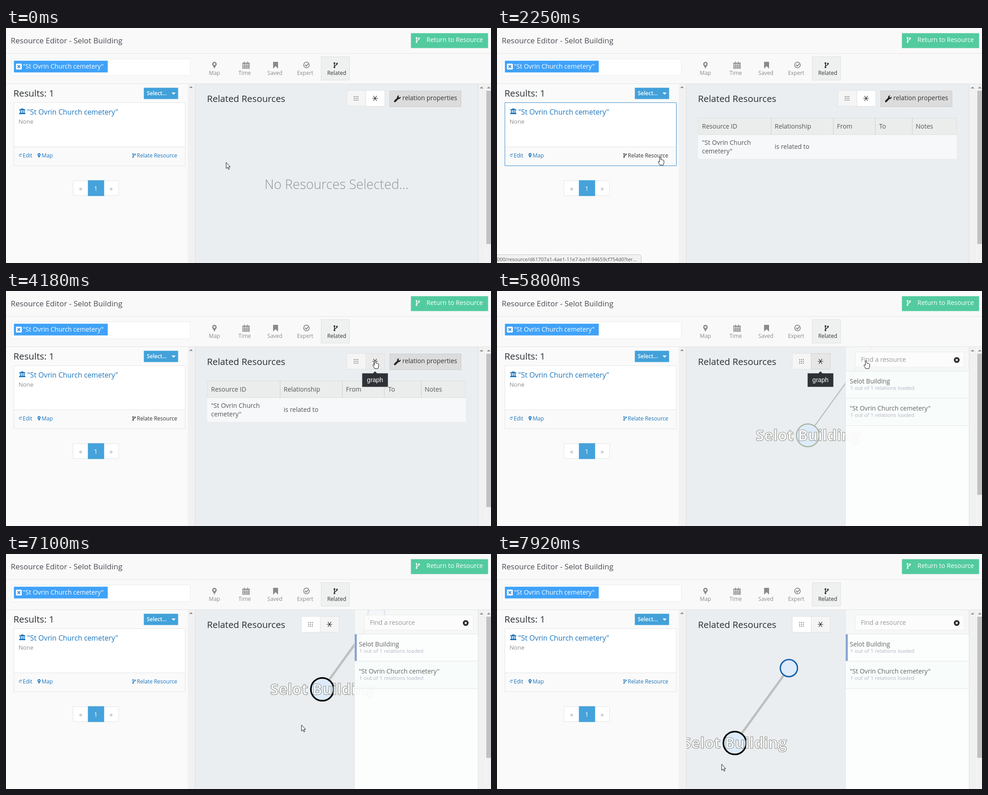
Animation, 1075 px wide and 521 px high, one loop 7.99 s. Source, as an HTML page:

```html
<!DOCTYPE html>
<html lang="en">
<head>
<meta charset="utf-8">
<title>Resource Editor</title>
<style>
html, body { margin: 0; width: 100%; height: 100%; overflow: hidden; background: #fafafa; }
svg { display: block; width: 1075px; height: 521px; }
text { font: 14px "Open Sans", sans-serif; fill: #555; white-space: pre; }
.mid { text-anchor: middle; }
.h { font-size: 20.3px; fill: #2b2f33; }
.s12 { font-size: 12px; }
.nav { font-size: 12px; fill: #8a8a8a; text-anchor: middle; }
.blue { fill: #1c75bc; }
.white { fill: #fff; }
.sub { font-size: 11.65px; fill: #b4b5c2; }
.box { fill: #fff; stroke: #e4e4e4; }
.line { fill: none; stroke: #e4e4e4; }
.arrow { fill: #8d8d8d; }
#label { font-size: 33.7px; font-weight: 700; text-anchor: middle; fill: #fff; stroke: #8f8f86; stroke-width: 1.1; }
</style>
</head>
<body>
<svg viewBox="0 0 1075 521">
  <defs>
    <g id="fork" fill="none" stroke="currentColor" stroke-width="1.5">
      <circle cx="2" cy="2" r="1.2"/><circle cx="2" cy="11" r="1.2"/><circle cx="7.5" cy="3" r="1.2"/>
      <path d="M2 3V10M7.5 4C7.5 7.5 2 6 2 9"/>
    </g>
    <path id="pin" d="M5 0A5 5 0 0 0 0 5C0 8 3 10 5 15.5C7 10 10 8 10 5A5 5 0 0 0 5 0ZM5 2.8A2.2 2.2 0 1 1 5 7.2A2.2 2.2 0 1 1 5 2.8Z" fill="currentColor" fill-rule="evenodd"/>
    <path id="up" d="M0 4L4 0L8 4Z"/>
    <path id="dots" d="M0 0H10M0 4H10M0 8H10" fill="none" stroke="#444" stroke-width="1.6" stroke-dasharray="1.8 2.2"/>
    <path id="star" d="M-6 0H6M-3.5 -5.5L3.5 5.5M3.5 -5.5L-3.5 5.5" fill="none" stroke="#222" stroke-width="1.2"/>
    <clipPath id="stage"><path d="M420 124H1046V521H420Z"/></clipPath>
  </defs>

  <!-- top bars -->
  <path d="M0 0H1075V123H0Z" fill="#f9f9f9"/>
  <path class="line" d="M0 56.5H1075M0 123.5H1075"/>
  <text x="10.5" y="34" style="font-size:17px;fill:#4a4d55">Resource Editor - Selot Building</text>
  <path d="M897.5 11.5H1068.5V44.5H897.5Z" fill="#52cb9f"/>
  <use href="#fork" x="908" y="20" color="#fff"/>
  <text class="white" x="932" y="31">Return to Resource</text>
  <path class="box" d="M12.5 68.5H408.5V105.5H12.5Z" style="stroke:#ebebeb"/>
  <path d="M17.5 72.5H225.5V98.5H17.5Z" fill="#3fa2f8"/>
  <rect x="22" y="79" width="13" height="13" rx="1.5" fill="#fff"/>
  <path d="M25.5 82.5L31.5 88.5M31.5 82.5L25.5 88.5" stroke="#4a90d0" stroke-width="2.2"/>
  <text class="white" x="37.5" y="90">"St Ovrin Church cemetery"</text>

  <rect x="698.5" y="63.5" width="63" height="52" fill="#eff1f1" stroke="#dfe1e1"/>
  <g color="#8a8a8a" fill="none" stroke="#8a8a8a">
    <use href="#pin" x="457" y="75" stroke="none"/>
    <path d="M524.5 77.5H539.5V89.5H524.5ZM524 79.5H540M524 83.5H540M524 86.5H540M528.5 80V90M532.5 80V90M536.5 80V90M528.5 74V79M535.5 74V79" stroke-width="1.3"/>
    <path d="M592 75H603V90L597.5 84.5L592 90Z" fill="#8a8a8a" stroke="none"/>
    <circle cx="666" cy="82" r="6.3" stroke-width="1.7"/>
    <path d="M662.5 81.5L665.5 84.5L670 79.5" stroke-width="2"/>
  </g>
  <use href="#fork" x="726" y="76" color="#222"/>
  <text class="nav" x="462" y="104">Map</text>
  <text class="nav" x="529" y="104">Time</text>
  <text class="nav" x="596" y="104">Saved</text>
  <text class="nav" x="663" y="104">Expert</text>
  <text class="nav" x="733" y="104" style="fill:#333">Related</text>

  <!-- results -->
  <text class="h" x="16.5" y="152">Results: 1</text>
  <path d="M305.5 132.5H381.5V157.5H305.5Z" fill="#42a1da"/>
  <text class="white s12" x="312" y="149" style="font-weight:600">Select...</text>
  <path d="M367 143H376L371.5 148Z" fill="#fff"/>
  <path d="M17 165H398V305H17Z" fill="#fff"/>
  <path d="M17 263H398V305H17Z" fill="#fafafa"/>
  <path class="line" d="M17 263.5H398"/>
  <path class="line" id="card" d="M17.5 165.5H397.5V305.5H17.5Z"/>
  <path class="blue" d="M36 178L43 181V182.5H29V181ZM31 183H33V188H31ZM35 183H37V188H35ZM39 183H41V188H39ZM30 188H42V189H43V191H29V189H30Z"/>
  <text class="blue" x="47" y="192" style="font-size:15.8px">"St Ovrin Church cemetery"</text>
  <text x="27.8" y="212" style="font-size:13px;fill:#8b8b8b">None</text>
  <path d="M33.5 280.3A2.6 2.6 0 1 0 34 283.5M34 278.5V281H31.5" fill="none" stroke="#1c75bc"/>
  <text class="blue s12" x="37" y="287">Edit</text>
  <use href="#pin" transform="translate(70 277.5) scale(.66 .69)" color="#1c75bc"/>
  <text class="blue s12" x="79" y="287">Map</text>
  <g id="relate">
    <use href="#fork" transform="translate(280 277.5) scale(.8)"/>
    <text class="s12" x="290" y="287" style="fill:currentColor">Relate Resource</text>
  </g>
  <path class="box" d="M148.5 338.5H249.5V371.5H148.5Z"/>
  <path d="M181.5 337.5H217.5V372.5H181.5Z" fill="#45a2da"/>
  <text class="mid" x="165.5" y="361" style="fill:#999">«</text>
  <text class="mid white" x="199" y="361">1</text>
  <text class="mid" x="233" y="361" style="fill:#999">»</text>
  <path d="M403 124H419V521H403Z" fill="#f1f1f1"/>
  <use class="arrow" href="#up" x="406" y="129"/>

  <!-- related resources -->
  <path d="M419.5 124V521M1046.5 124V521" stroke="#dcdfe1"/>
  <path d="M420 124H1046V521H420Z" fill="#eaeef1"/>
  <path d="M1047 124H1075V521H1047Z" fill="#f1f1f1"/>
  <path d="M1063.5 124V521" stroke="#fafafa"/>
  <use class="arrow" href="#up" x="1050" y="130"/>
  <use class="arrow" href="#up" x="1066" y="130"/>
  <rect id="thumb" x="1064.5" y="139" width="10.5" height="340" fill="#c1c1c1"/>

  <g id="graph" clip-path="url(#stage)">
    <line id="link" stroke="#bfbfbf"/>
    <circle id="other" r="19" fill="#ddebfa" stroke="#1860aa" stroke-width="3"/>
    <circle id="node" r="25.3" fill="#ddebfa"/>
    <text id="label">Selot Building</text>
    <path d="M772 124H1047V521H772Z" fill="#fff" fill-opacity=".88"/>
    <path d="M772 124H1047V177H772Z" fill-opacity=".025"/>
    <path d="M773 178H1047V298H773Z" fill="#e6f2ee" fill-opacity=".2"/>
    <g id="chosen"><path d="M773 178H1047V237H773Z" fill="#fff" fill-opacity=".6"/><path d="M772 177H777.5V238H772Z" fill="#89a2d0"/></g>
    <path d="M772.5 124V521M772 177.5H1047M772 237.5H1047M772 298.5H1047" class="line" style="stroke:#e2e7e7"/>
    <path class="box" d="M794.5 135.5H1035.5V168.5H794.5Z" style="stroke:#ececec" fill-opacity=".7"/>
    <text x="806.5" y="157" style="fill:#999">Find a resource</text>
    <circle cx="1019" cy="153" r="6.3" fill="#222"/>
    <path d="M1016.7 150.7L1021.3 155.3M1021.3 150.7L1016.7 155.3" stroke="#fff" stroke-width="1.7"/>
    <text x="782" y="205" style="fill:#666">Selot Building</text>
    <text class="sub" x="783" y="219">1 out of 1 relations loaded</text>
    <text x="782" y="265" style="fill:#666">"St Ovrin Church cemetery"</text>
    <text class="sub" x="783" y="279">1 out of 1 relations loaded</text>
  </g>

  <text class="h" x="445.5" y="164">Related Resources</text>
  <text id="empty" class="mid" x="732.5" y="357" style="font-size:29px;font-weight:300;fill:#929496">No Resources Selected...</text>
  <g id="table">
    <path d="M446 199H1019V237H446Z" fill="#ebecec"/>
    <path d="M446 237H1019V290H446Z" fill="#f7f8f9"/>
    <path d="M446.5 237V199.5H1018.5V237M446 236.5H1019" fill="none" stroke="#dedfe0"/>
    <path d="M607.5 199V237M745.5 199V237M838.5 199V237M920.5 199V237" stroke="#cdcfd0"/>
    <text x="454.5" y="223">Resource ID</text>
    <text x="615.5" y="223">Relationship</text>
    <text x="753.5" y="223">From</text>
    <text x="847" y="223">To</text>
    <text x="928" y="223">Notes</text>
    <text x="454.5" y="259">"St Ovrin Church</text>
    <text x="454.5" y="278">cemetery"</text>
    <text x="615.5" y="268">is related to</text>
  </g>
  <g id="props">
    <path d="M850.5 139.5H1008.5V174.5H850.5Z" fill="#dcdcdc" stroke="#cbcbcb"/>
    <path d="M862 162.5L869 155.5" stroke="#222" stroke-width="4" stroke-linecap="round"/>
    <path d="M874.5 152A4 4 0 1 1 871 149.5L870 153L872 154.5Z" fill="#222"/>
    <text x="878.5" y="160" style="fill:#333">relation properties</text>
  </g>
  <g id="tools">
    <rect id="gridBtn" x="755.5" y="138.5" width="42" height="35" stroke="#e0e0e0"/>
    <rect id="graphBtn" x="797.5" y="138.5" width="42" height="35"/>
    <use href="#dots" x="771" y="152"/>
    <use href="#star" x="818" y="156"/>
    <g id="tip">
      <path d="M789.5 182.5H813.5L818 178L822.5 182.5H846.5V212.5H789.5Z" fill="#2e3135"/>
      <text class="mid white" x="818" y="202" style="font-family:'Liberation Sans',Arial,sans-serif">graph</text>
    </g>
  </g>
  <g id="status">
    <path d="M-1 502.5H315Q319.5 502.5 319.5 507V522H-1Z" fill="#f2f2f2" stroke="#c4c4c4"/>
    <text x="0" y="517" style="font-size:11px">000/resource/d61707a1-4ae1-11e7-ba1f-94659cf754d0?ter...</text>
  </g>

  <path id="pointer" d="M0 0V13.5L3 10.8L5.2 15.6L7.2 14.7L5.1 10H9Z" fill="#fff" stroke="#111" stroke-linejoin="round"/>
  <path id="hand" d="M-1.5 1.2Q0 -.8 1.5 1.2V6Q2.5 5 4 6.5Q5.5 5.8 6.2 7.2Q8 7 8 9V13Q7.5 15 6.5 18H-1Q-2 15 -4.7 11.5Q-5.2 9.5 -3.5 9.5L-1.5 11Z" fill="#fff" stroke="#111" stroke-linejoin="round"/>
</svg>
<script>
const LOOP = 7990;
const $ = id => document.getElementById(id);

// bursts of picture updates: start, end, steps
const BURSTS = [[0, 0, 1], [290, 1030, 11], [1130, 1260, 3], [2250, 2250, 1], [2560, 3310, 11],
  [3380, 4110, 11], [4180, 4180, 1], [5330, 5560, 4], [5800, 6510, 11], [6600, 7330, 11], [7410, 7920, 8]];

// time, x, y
const CURSOR = [[216, 488, 298], [600, 440, 302], [1030, 362, 286], [2490, 362, 286],
  [3310, 504, 331], [4110, 818, 154], [5800, 818, 154], [6440, 758, 218],
  [6740, 757, 260], [7111, 655, 379], [7330, 541, 386], [7920, 498, 466]];
const NODE = [[5800, 689, 320], [6440, 772, 253], [6510, 782, 246], [6740, 772, 253],
  [7111, 701, 300], [7330, 575, 306], [7920, 527, 419]];
const SPREAD = [[5800, 1.35], [6440, 1.2], [6800, 1]];

function snap(t) {
  const [a, b, n] = BURSTS.findLast(s => s[0] <= t);
  if (n < 2) return a;
  const gap = (b - a) / (n - 1);
  return a + gap * Math.min(n - 1, Math.floor((t - a) / gap + 0.25));
}

function at(keys, t) {
  const i = keys.findIndex(k => k[0] >= t);
  if (i < 0) return keys.at(-1).slice(1);
  if (i === 0) return keys[0].slice(1);
  const p = keys[i - 1], q = keys[i], f = (t - p[0]) / (q[0] - p[0]);
  return p.slice(1).map((v, j) => v + (q[j + 1] - v) * f);
}

function set(id, attrs) {
  for (const k in attrs) $(id).setAttribute(k, attrs[k]);
}
const show = (id, on) => set(id, { visibility: on ? "visible" : "hidden" });
const inside = ([x, y], l, t, r, b) => x >= l && x <= r && y >= t && y <= b;

function drawGraph(t) {
  const [x, y] = at(NODE, t), [k] = at(SPREAD, t);
  const ox = x + 120 * k, oy = y - 166 * k;
  const picked = t >= 6735;
  set("link", { x1: x, y1: y, x2: ox, y2: oy, "stroke-width": picked ? 5 : 2.5 });
  set("other", { cx: ox, cy: oy });
  set("node", { cx: x, cy: y, stroke: picked ? "#000" : "#a9b5a0", "stroke-width": picked ? 3.5 : 2.5 });
  set("label", { x, y: y + 12, "fill-opacity": picked ? 0.6 : 0.95 });
  $("chosen").style.display = picked ? "" : "none";
}

function render(time) {
  const t = snap(time), graph = t >= 5800;
  const pos = at(CURSOR, t);
  const onLink = inside(pos, 281, 274, 378, 292);
  const onButton = t < 5860 && inside(pos, 797, 138, 839, 174);
  const hand = onLink || onButton;

  show("pointer", !hand);
  show("hand", hand);
  set(hand ? "hand" : "pointer", { transform: `translate(${pos})` });
  $("card").style.stroke = inside(pos, 17, 165, 398, 305) ? "#3d8fcb" : "";
  set("relate", { color: onLink || (t >= 2250 && t < 5330) ? "#333" : "#1c75bc" });
  set("status", { opacity: onLink ? Math.max(0, Math.min(1, (t - 1065) / 195)) : 0 });

  show("empty", t < 2250);
  show("table", t >= 2250 && !graph);
  show("props", !graph);
  $("graph").style.display = graph ? "" : "none";
  set("thumb", { height: graph ? 313 : 340 });
  set("tools", { transform: `translate(${graph ? -101 : 0})` });
  show("tip", onButton || (graph && t < 6600));

  const pressed = t >= 5330 && t < 5860;
  const fill = pressed ? "#e6e6e6" : onButton || (graph && t < 6600) ? "#ebebeb" : graph ? "#f5f5f5" : "#fff";
  set("graphBtn", { fill, stroke: pressed ? "#cfcfcf" : "#e0e0e0" });
  set("gridBtn", { fill: t >= 5860 ? "#fff" : "#f5f5f5" });
  if (graph) drawGraph(t);
}

const start = performance.now();
function tick() {
  render((performance.now() - start) % LOOP);
  requestAnimationFrame(tick);
}
tick();
</script>
</body>
</html>
```
